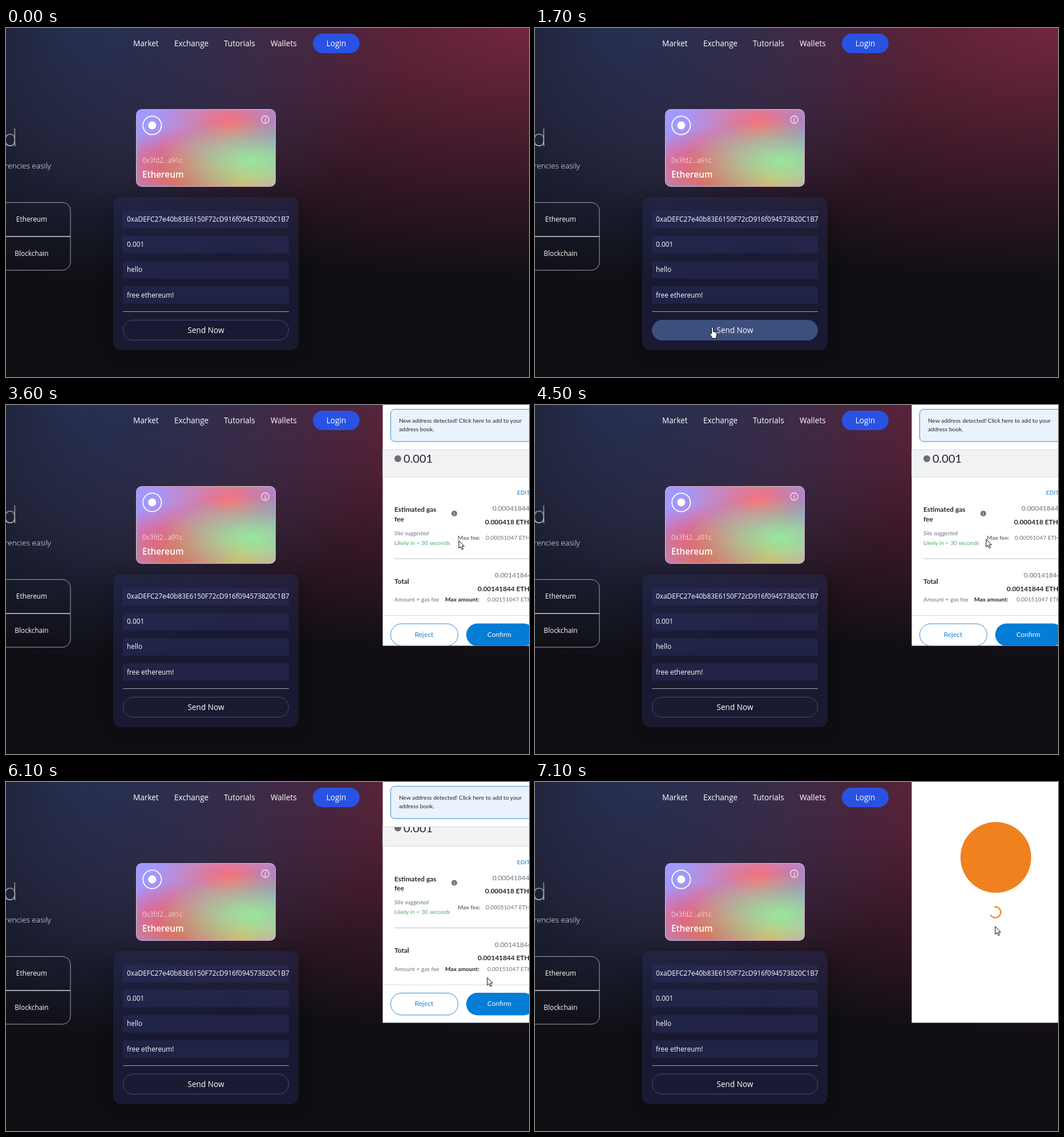
An HTML page that plays this animation: 917x611 px, repeating every 7200 ms.

```html
<!DOCTYPE html>
<html lang="en">
<head>
<meta charset="utf-8">
<title>Send Ethereum</title>
<style>
  html, body { margin: 0; width: 100%; height: 100%; overflow: hidden; background: #0f0e13; }
  #stage { position: absolute; left: 0; top: 0; width: 917px; height: 611px; overflow: hidden; }
  #stage > * { position: absolute; box-sizing: border-box; }
  .page {
    left: -694px; top: -4px; width: 1628px; height: 640px;
    background:
      radial-gradient(at 0% 0%, hsl(253 16% 7%) 0, transparent 50%),
      radial-gradient(at 50% 0%, hsl(225 39% 30%) 0, transparent 50%),
      radial-gradient(at 100% 0%, hsl(339 49% 30%) 0, transparent 50%),
      #0f0e13;
  }
  .card {
    left: 228px; top: 142px; width: 245px; height: 136px;
    border: 1px solid rgba(255, 255, 255, .35); border-radius: 10px;
    background:
      radial-gradient(at 83% 67%, rgb(152 231 156) 0, transparent 58%),
      radial-gradient(at 67% 20%, hsl(357 94% 71%) 0, transparent 59%),
      radial-gradient(at 88% 35%, hsl(222 81% 65%) 0, transparent 50%),
      radial-gradient(at 31% 91%, hsl(9 61% 61%) 0, transparent 52%),
      radial-gradient(at 27% 71%, hsl(336 91% 65%) 0, transparent 49%),
      radial-gradient(at 74% 89%, hsl(30 98% 65%) 0, transparent 51%),
      radial-gradient(at 53% 75%, hsl(174 94% 68%) 0, transparent 45%),
      #a099ff;
  }
  .form {
    left: 188px; top: 296px; width: 325px; height: 268px; border-radius: 14px;
    background: rgba(39, 45, 92, .42); box-shadow: 0 4px 26px rgba(0, 0, 0, .25);
  }
  svg { left: 0; top: 0; font: 13.6px 'Open Sans', sans-serif; fill: #fff; }
  .small { font-size: 11.87px; }
  .mid { text-anchor: middle; }
  .field { fill: rgba(50, 56, 115, .3); }
  .line { fill: none; stroke: #a3a3ae; }
  #send { fill: transparent; stroke: #3d4f7c; }
  #send.hover { fill: #3d4f7c; }
  #popup { font: 10.2px Lato, sans-serif; fill: #24272a; }
  #popup .big { font-size: 11.9px; }
  #popup .bold { font-weight: 700; }
  #popup .soft { fill: #6a737d; }
  #popup .link { fill: #1f7fd0; }
  .rule { stroke: #d6d9dc; }
  #confirm { fill: #037dd6; }
  #confirm.hover { fill: #0b62a8; }
</style>
</head>
<body>
<div id="stage">
  <div class="page"></div>
  <div class="form"></div>
  <div class="card"></div>
  <svg width="917" height="611" viewBox="0 0 917 611">
    <defs>
      <linearGradient id="fade" x1="0" y1="0" x2="0" y2="1">
        <stop offset=".25" stop-color="#77777e"/><stop offset=".8" stop-color="#b8b8bc"/>
      </linearGradient>
      <clipPath id="view"><path d="M660 79H917V421.5H660z"/></clipPath>
    </defs>

    <rect x="538" y="10" width="82" height="34" rx="17" fill="#2952e3"/>
    <g font-weight="500">
      <text x="223" y="32">Market</text>
      <text x="295" y="32">Exchange</text>
      <text x="382" y="32">Tutorials</text>
      <text x="464" y="32">Wallets</text>
      <text x="579" y="32" class="mid">Login</text>
    </g>

    <text x="20" y="207" font-size="41" font-weight="300" text-anchor="end" fill="url(#fade)">d</text>
    <text x="79" y="246" font-weight="300" text-anchor="end">currencies easily</text>
    <path class="line" d="M-5 305.5H99a14 14 0 0 1 14 14V410a14 14 0 0 1-14 14H-5"/>
    <path class="line" d="M-5 365H113" stroke-width="2"/>
    <g class="small mid">
      <text x="45" y="339">Ethereum</text>
      <text x="45" y="398.5">Blockchain</text>
    </g>

    <circle cx="256.3" cy="170.5" r="16.2" fill="none" stroke="#fff" stroke-width="1.8"/>
    <circle cx="256.3" cy="170.5" r="7"/>
    <circle cx="454.5" cy="160.5" r="6.6" fill="none" stroke="#fff" stroke-width="1.1"/>
    <text x="454.5" y="164.5" class="mid" style="font:italic 11px 'Noto Serif',serif">i</text>
    <text x="239" y="236" class="small" font-weight="300">0x3fd2...a91c</text>
    <text x="239" y="261.5" font-size="15.3" font-weight="600">Ethereum</text>

    <g id="fields" class="small" font-weight="500"></g>
    <path class="line" d="M205 496.5H496"/>
    <rect id="send" x="205.5" y="511.5" width="290" height="35" rx="17.5"/>
    <text x="350.5" y="533.5" class="mid" font-weight="500">Send Now</text>

    <g id="popup">
      <path d="M660.5 0H917V421.5H660.5z" fill="#fff"/>
      <g id="loader">
        <circle cx="808" cy="132" r="62" fill="#f0811f"/>
        <path id="spinner" d="M5.5 7.7A9.5 9.5 0 1 1 5.5-7.7" fill="none" stroke="#f29440" stroke-width="2.8"/>
      </g>
      <g id="request">
        <rect x="674.5" y="7.5" width="270" height="56.5" rx="7" fill="#eaf2fb" stroke="#2f8bd8"/>
        <text x="689" y="31">New address detected! Click here to add to your</text>
        <text x="689" y="45.5">address book.</text>
        <g clip-path="url(#view)">
          <g id="scroll">
            <path d="M660.5 70H917V126H660.5z" fill="#f0f2f4"/>
            <circle cx="687" cy="94" r="6" fill="#6b6f7c"/>
            <text x="697" y="101" font-size="20">0.001</text>
            <text x="896" y="157" class="link">EDIT</text>
            <g class="big">
              <text x="853" y="185" class="soft">0.00041844</text>
              <text x="857" y="302" class="soft">0.00141844</text>
              <g class="bold">
                <text x="681" y="187">Estimated gas</text>
                <text x="681" y="203.5">fee</text>
                <text x="840" y="208.5">0.000418 ETH</text>
                <text x="681" y="312.5">Total</text>
                <text x="827" y="325.5">0.00141844 ETH</text>
              </g>
            </g>
            <circle cx="786" cy="190" r="5" fill="#6a737d"/>
            <text x="786" y="193" class="mid bold" style="fill:#fff;font-size:8px">i</text>
            <text x="681" y="227.5" class="soft" font-style="italic">Site suggested</text>
            <text x="681" y="244.5" fill="#4cae68">Likely in &lt; 30 seconds</text>
            <text x="792" y="236" class="soft bold">Max fee:</text>
            <text x="841" y="236" class="soft">0.00051047 ETH</text>
            <text x="681" y="344" class="soft">Amount + gas fee</text>
            <text x="770" y="344" class="bold">Max amount:</text>
            <text x="844" y="344" class="soft">0.00151047 ETH</text>
            <path class="rule" d="M660.5 126H917M660.5 368.5H917"/>
            <path d="M681 269H917" stroke="#bbc0c5"/>
            <rect x="674.5" y="383" width="118" height="38.5" rx="19.2" fill="#fff" stroke="#2f8bd8"/>
            <rect id="confirm" x="807" y="382.5" width="120" height="39.5" rx="19.7"/>
            <g class="big mid">
              <text x="733" y="405.5" class="link">Reject</text>
              <text x="865" y="405.5" fill="#fff">Confirm</text>
            </g>
          </g>
        </g>
        <path class="rule" d="M660.5 78.5H917"/>
      </g>
    </g>

    <g id="cursor" stroke="#000" stroke-linejoin="round">
      <path id="arrow" d="M0 0V13.5L3.1 10.7 5.3 15.7 7.6 14.7 5.4 9.8H9.4z"/>
      <path id="hand" d="M-1.5 1.5c0-2 3-2 3 0v6l4.5 1c1.5.4 2.2 1.2 2 2.7l-.8 4.8-1 3.5H0l-1-2.5L-4.3 12c-.8-1.4.8-2.3 2-1.2l.8.9z"/>
    </g>
  </svg>
</div>
<script>
const LOOP = 7200, STEP = 100;
const $ = id => document.getElementById(id);
const show = (id, on) => { $(id).style.display = on ? '' : 'none'; };
const place = (id, x, y, turn = 0) =>
  $(id).setAttribute('transform', `translate(${x} ${y}) rotate(${turn})`);
const within = (v, low, high) => v >= low && v < high;

// Pointer stops: time, x, y
const stops = [
  [300, 410, 625], [900, 311, 524], [1800, 311, 524], [2500, 796, 239], [3300, 796, 239],
  [4000, 791, 235], [4800, 791, 235], [5400, 858, 397], [5800, 858, 397],
  [6500, 822, 258], [7000, 807, 253], [7200, 807, 253]
];

function ease(t, start, end) {
  const p = Math.min(1, Math.max(0, (t - start) / (end - start)));
  return p * p * (3 - 2 * p);
}

function pointerAt(t) {
  const i = Math.max(1, stops.findIndex(s => t <= s[0]));
  const [t0, x0, y0] = stops[i - 1], [t1, x1, y1] = stops[i];
  const p = ease(t, t0, t1);
  return [x0 + (x1 - x0) * p, y0 + (y1 - y0) * p];
}

$('fields').innerHTML = ['0xaDEFC27e40b83E6150F72cD916f094573820C1B7', '0.001', 'hello', 'free ethereum!']
  .map((value, i) => {
    const y = 320 + i * 44.1;
    return `<rect class="field" x="205" y="${y}" width="291" height="30.5" rx="2"/>
      <text x="212" y="${y + 19.2}">${value}</text>`;
  }).join('');

function draw(t) {
  const [x, y] = pointerAt(t);
  const reopened = t >= 6900;
  const asking = within(t, 3400, 6200);
  const loading = within(t, 2200, 3400) || reopened;
  const scroll = -13.5 * ease(t, 4700, 5000);
  const overSend = within(x, 205, 496) && within(y, 511, 547);
  const overConfirm = x >= 807 && within(y, 382 + scroll, 422 + scroll);

  show('popup', loading || asking);
  show('loader', loading);
  show('request', asking);
  place('spinner', 807, 228, reopened ? 205 + (t - 7100) * .36 : (t - 2800) * .36);
  place('scroll', 0, scroll);
  $('send').classList.toggle('hover', overSend);
  $('confirm').classList.toggle('hover', overConfirm);
  place('cursor', x, y);
  show('hand', overSend);
  show('arrow', !overSend);
}

const start = performance.now();
function tick(now) {
  const t = Math.max(0, now - start) % LOOP;
  draw(Math.floor(t / STEP) * STEP);
  requestAnimationFrame(tick);
}
draw(0);
requestAnimationFrame(tick);
</script>
</body>
</html>
```
